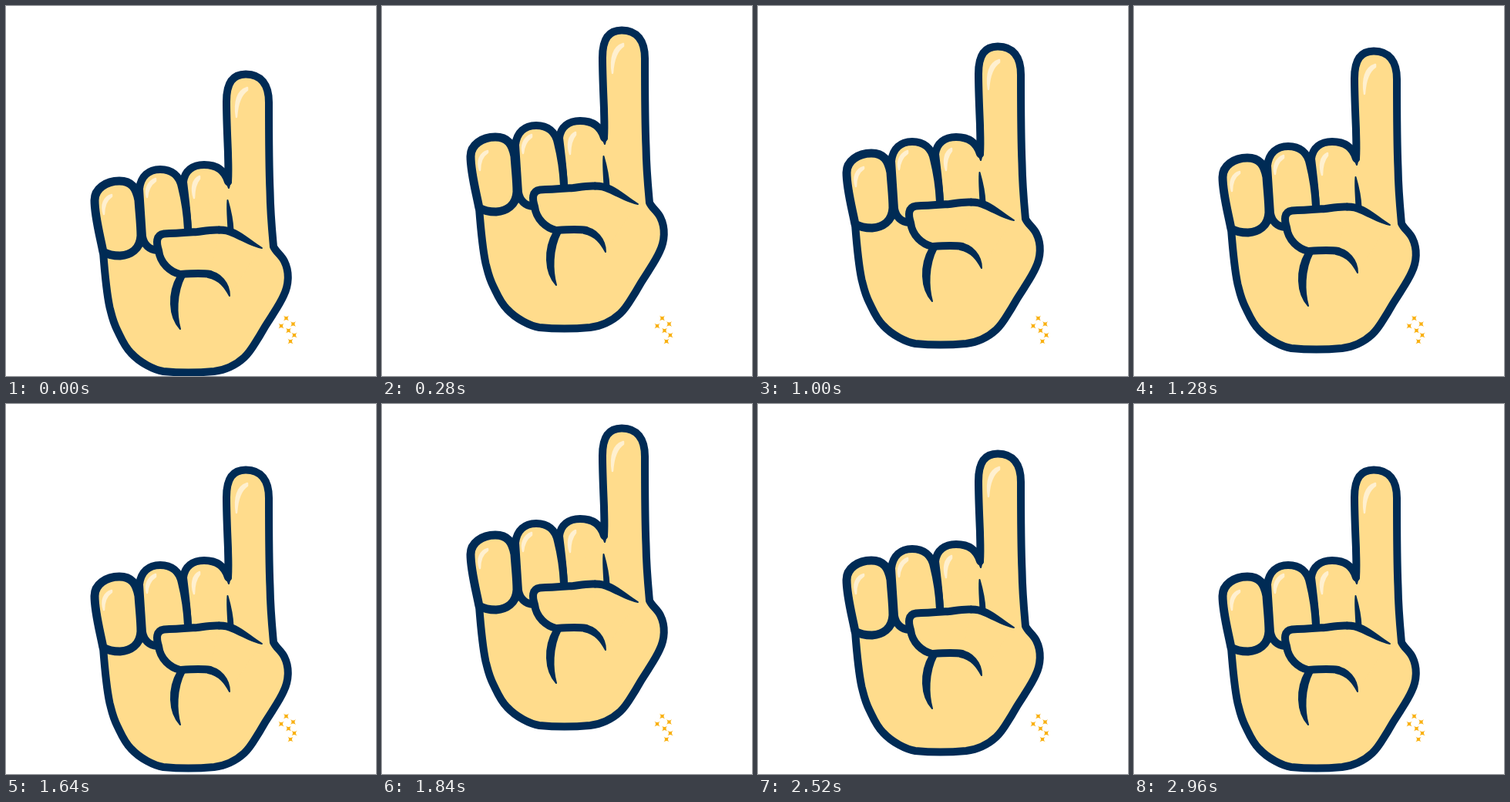
Recreate the animation shown at these times as an HTML page. Size 480x480 px, loop 3000 ms.

```html
<!DOCTYPE html>
<html lang="en">
<head>
<meta charset="utf-8">
<title>Bouncing hand</title>
<style>
  html, body { margin: 0; height: 100%; overflow: hidden; background: #fff; }
  svg { display: block; width: 100%; height: 100%; }
  #hand { fill: #ffdc8c; stroke: #002b55; stroke-width: 10; stroke-linecap: round; stroke-linejoin: round; }
  .ink { fill: #002b55; stroke-width: 2; }
  .shine { fill: #fff0d0; stroke: #fff0d0; stroke-width: 2.5; }
  #stars { fill: #f9b114; }
</style>
</head>
<body>
<svg viewBox="0 0 480 480">
  <defs><path id="star" d="M-3.500-3.500 Q0-.5 3.500-3.500 Q.5 0 3.500 3.500 Q0 .5-3.500 3.500 Q-.5 0-3.500-3.500Z"/></defs>
  <g id="stars"></g>
  <g id="hand">
    <!-- index finger and palm -->
    <path d="M288 228 C289 210 288 200 288 190 C287 165 286 145 286 124 C286 100 294 88.500 311 88.500 C331 88.500 341 102 341 125 C341 165 341 205 342.500 240 C343 270 345 290 347 312
      C350 319 357 323 361 331 C368 345 367 362 360 376 C356 385 350 394 345 402 C339 411 334 419 329 428 C322 439 317 449 309 456 C298 466 286 472 270 474 C248 476 225 476 204 474 C192 472 174 463 162 450 C153 441 149 430 144.500 421 C138 408 137 400 134.500 391 C130 370 128 345 126 319"/>
    <!-- folded fingers -->
    <path d="M288 228 C284 214 274 206 257 206 C242 206 232 214 230 228 C232 246 235 266 236 290"/>
    <path class="ink" d="M284 224 L289 236 L292 224Z"/>
    <path d="M236 290 C235 269 232 251 228 235 C225 220 215 212 200 212 C185 212 175 221 173 237 L177 299 C179 310 186 316 196 317"/>
    <path style="stroke-width:11" d="M126 319 C122 298 115 273 115 252 C115 237 130 227 147 227 C163 227 169 236 172 252 C173 268 175 284 175 298 C174 316 161 323 148 324 C138 324 131 322 126 319"/>
    <path class="ink" d="M287.500 252 C286.500 264 288 277 288.500 291 L294.500 291 C294 277 291 264 287.500 252Z"/>
    <!-- thumb -->
    <path stroke="none" d="M197 296 C230 298 250 291 285 292 L330 315 L290 375 C280 346 250 347 222 348 C202 336 195 316 197 296Z"/>
    <path d="M276 290.500 C265 290 256 292 248 293 C233 294 219 295 205 295.500 C194 297 195 308 198 317 C200 334 213 345 226 348 C240 347 253 346 265 348"/>
    <path class="ink" d="M276 286.500 C300 286 312 302 332 314 C316 311 306 303 293 298 C287 295 282 294.500 276 294.500Z"/>
    <path class="ink" d="M262 344 C278 345 290 360 290 376 C284 365 277 355 262 352Z"/>
    <path class="ink" d="M223 350 C210 372 211 403 226 419 C221 401 220 373 232 350Z"/>
    <!-- highlights -->
    <g transform="translate(1 1)">
      <path class="shine" d="M312 105 C299 109 295 124 298 143 C299 127 303 114 312 108Z"/>
      <path class="shine" d="M136 244 C126 247 122 257 126 269 C126 258 130 250 136 246Z"/>
      <path class="shine" d="M193 223 C183 227 179 237 182 247 C183 237 187 230 193 226Z"/>
      <path class="shine" d="M250 220 C241 224 239 236 243 248 C243 237 245 229 250 223Z"/>
    </g>
  </g>
</svg>
<script>
  const LOOP = 3000, STEP = 40, HEIGHT = 60, UP = 7, DOWN = 8;
  const starts = [40, 840, 1600, 2400];
  const hand = document.getElementById('hand');

  document.getElementById('stars').innerHTML =
    [[363.5, 405], [357, 415], [372.5, 412.5], [366.5, 421], [374, 427], [369, 435]]
      .map(([x, y]) => `<use href="#star" x="${x}" y="${y}"/>`).join('');

  const ease = p => p * p * (3 - 2 * p);

  function lift(t) {
    const start = starts.findLast(s => s <= t);
    if (start === undefined) return 0;
    const step = Math.min(Math.floor((t - start) / STEP), UP + DOWN);
    const p = step < UP ? step / UP : (UP + DOWN - step) / DOWN;
    return Math.round(HEIGHT * ease(p));
  }

  function draw() {
    hand.setAttribute('transform', `translate(0 ${-lift(performance.now() % LOOP)})`);
    requestAnimationFrame(draw);
  }
  draw();
</script>
</body>
</html>
```
